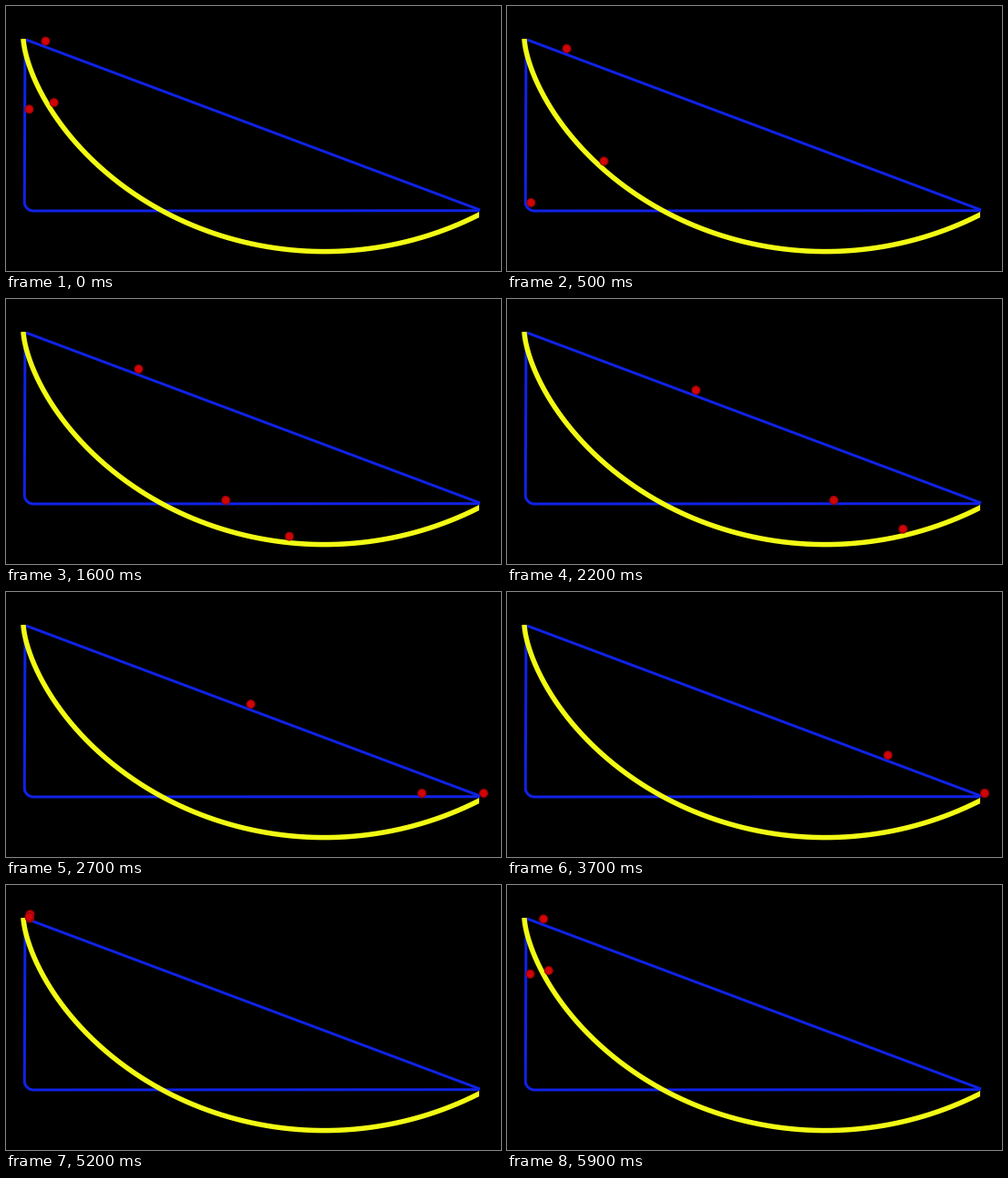
A matplotlib script for the animation above (6 s loop, 544x291 px).

```python
import numpy as np
import matplotlib.pyplot as plt
from matplotlib.animation import FuncAnimation
from matplotlib.patches import Circle, Rectangle

W, H, DPI = 544, 291, 100
FRAMES, INTERVAL = 60, 100
LOOP, LAUNCH = 6.0, 5.01
START, END = (26, 32), (525, 221)
BLUE, YELLOW = "#1022e6", "#f2fb14"
RED, RIM = "#d20406", "#960305"
PX = 72 / DPI

# Stretched cycloid: origin and horizontal / vertical radii
CX, CY, RX, RY = 19, 36, 105.3, 116.8


def cycloid(a):
    return CX + RX * (a - np.sin(a)), CY + RY * (1 - np.cos(a))


def ramp_ball(t):
    d = 17.85 * t**2
    if START[0] + d >= END[0]:
        return END
    return START[0] + d, START[1] + 0.375 * d


def curve_ball(t):
    a = 1.25 * t - 0.042 * t**2
    if t > 3.6 or a > 4.03:
        return END
    x, y = cycloid(a)
    # rest on the inner side of the curve
    return (x + 7 * np.cos(a / 2),
            y - 7 * np.sin(a / 2) - 4 * np.exp(-3 * a))


BEND = np.array([(25.5, 32), (25.5, 215), (31, 221), END])
BEND_S = np.r_[0, np.cumsum(np.hypot(*np.diff(BEND, axis=0).T))]
T_BEND, CRUISE = 1.523, 196


def corner_ball(t):
    s = 83 * min(t, T_BEND)**2 + CRUISE * max(t - T_BEND, 0)
    return np.interp(s, BEND_S, BEND[:, 0]), np.interp(s, BEND_S, BEND[:, 1])


fig = plt.figure(figsize=(W / DPI, H / DPI), dpi=DPI, facecolor="black")
ax = fig.add_axes([0, 0, 1, 1])
ax.set(xlim=(0, W), ylim=(H, 0))
ax.axis("off")


def track(x, y, color, width):
    return ax.plot(x, y, color=color, lw=width * PX, solid_capstyle="butt",
                   solid_joinstyle="round")[0]


track([22, 521], [37, 224], BLUE, 3)
track([21, 20.3, 20.5, 22.5, 25.5, 29, 520.5],
      [38, 214, 218, 221.5, 224, 225, 224.7], BLUE, 3)

curve = track(*cycloid(np.linspace(0, 4.1, 300)), YELLOW, 5.5)
curve.set_clip_path(Rectangle((0, 36), 520.3, H - 36, transform=ax.transData))

MOVES = (ramp_ball, curve_ball, corner_ball)
balls = [ax.add_patch(Circle(START, 4.4, fc=RED, ec=RIM, lw=1.2 * PX, zorder=5))
         for _ in MOVES]


def update(i):
    # balls wait at the top for a moment before the launch
    t = (i * INTERVAL / 1000 - LAUNCH + 0.15) % LOOP - 0.15
    for ball, move in zip(balls, MOVES):
        ball.center = move(max(t, 0))
    return balls


anim = FuncAnimation(fig, update, frames=FRAMES, interval=INTERVAL,
                     repeat=True, repeat_delay=0, blit=False)
plt.show()
```
